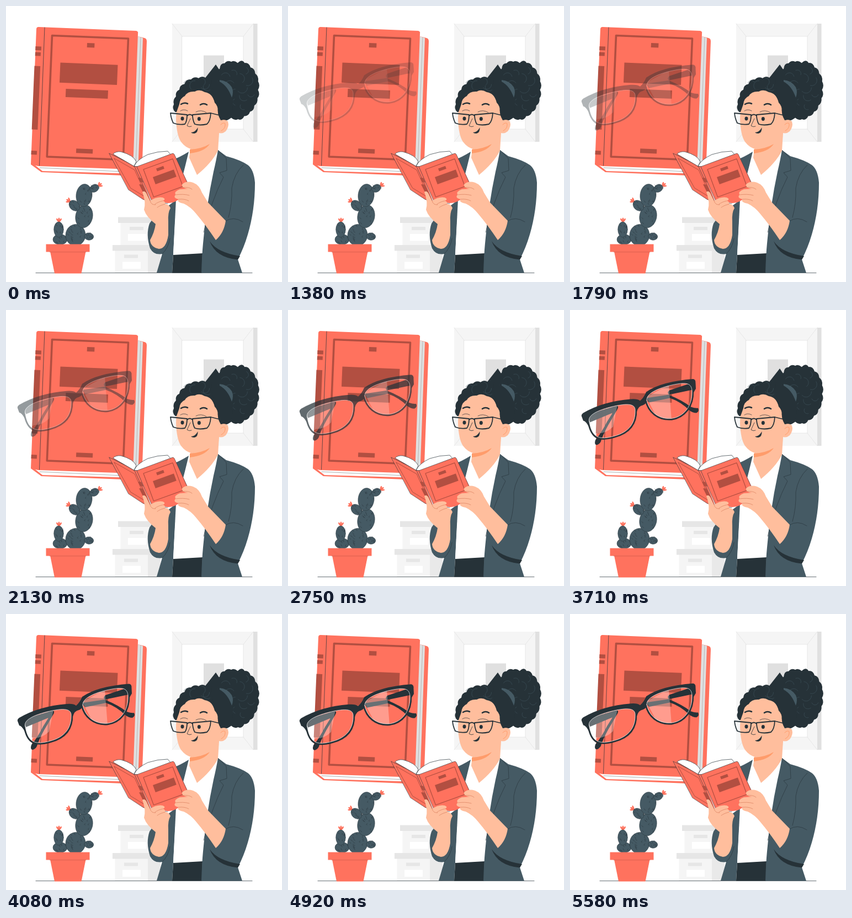
These frames come from a looping animation (500x500 px, 5.62 s). An HTML page with a canvas:

```html
<!DOCTYPE html>
<html lang="en">
<head>
<meta charset="utf-8">
<title>Reading</title>
<style>
html, body { margin: 0; width: 100%; height: 100%; overflow: hidden; background: #fff; }
canvas { display: block; width: 100vw; height: 100vh; }
</style>
</head>
<body>
<canvas id="stage"></canvas>
<script>
const SIZE = 500, LOOP = 5620, DROP = 30, TAU = Math.PI * 2;
const RED = '#ff725e', DEEP = '#b24f41', DARK = '#263238', SLATE = '#455a64';
const SKIN = '#ffbe9d', BLUSH = '#ff9c6b', PALE = '#f5f5f5', GREY = '#e0e0e0', WHITE = '#fff';

const scale = Math.max(1, window.devicePixelRatio || 1);

function prepare(canvas) {
  canvas.width = canvas.height = SIZE * scale;
  return canvas.getContext('2d');
}
const scene = document.createElement('canvas');
const layer = document.createElement('canvas');
const view = prepare(document.getElementById('stage'));
const sceneCtx = prepare(scene), layerCtx = prepare(layer);
sceneCtx.scale(scale, scale);
let g = sceneCtx;

let seed = 7;
const rnd = () => (seed = seed * 16807 % 2147483647) / 2147483647;

function fill(d, color) {
  g.fillStyle = color;
  g.fill(new Path2D(d));
}

function line(d, color = DARK, width = 0.7) {
  g.strokeStyle = color;
  g.lineWidth = width;
  g.lineCap = g.lineJoin = 'round';
  g.stroke(new Path2D(d));
}

function rect(x1, y1, x2, y2, color) {
  g.fillStyle = color;
  g.fillRect(x1, y1, x2 - x1, y2 - y1);
}

function oval(x, y, rx, ry, turn, color) {
  g.beginPath();
  g.ellipse(x, y, rx, ry, turn, 0, TAU);
  g.fillStyle = color;
  g.fill();
}

// Returns a painter of parallelograms lying on one slanted surface.
function surface(slope, lean) {
  return (x, y, w, h, border) => {
    const d = `M${x} ${y}l${w} ${w * slope}l${h * lean} ${h}l${-w} ${-w * slope}Z`;
    if (border) line(d, DEEP, border); else fill(d, DEEP);
  };
}

// Bumpy path along part of a rounded oval.
function curls(x, y, rx, ry, from, to, count, jitter) {
  const at = (a, k) => [Math.cos(a) * rx, Math.sin(a) * ry].map((v, i) => (i ? y : x) + v * k);
  const step = (to - from) / count;
  let d = 'M' + at(from, 1);
  for (let i = 0; i < count; i++) {
    const a = from + step * i, k = 1 + (rnd() - 0.5) * jitter;
    d += `Q${at(a + step / 2, k + 0.1)} ${at(a + step, i < count - 1 ? k : 1)}`;
  }
  return d;
}

// Loose strands scattered over an oval.
function strands(x, y, rx, ry, count) {
  for (let i = 0; i < count; i++) {
    const a = i * 2.4, r = Math.sqrt((i + 0.5) / count) * 0.9;
    g.beginPath();
    g.arc(x + Math.cos(a) * rx * r, y + Math.sin(a) * ry * r, 6 + rnd() * 4, a, a + 2.4);
    g.strokeStyle = SLATE;
    g.lineWidth = 0.5;
    g.stroke();
  }
}

function drawFrame() {
  rect(301, 32, 448, 246, PALE);
  rect(448, 32, 455.5, 246, GREY);
  rect(319, 55, 430, 223, WHITE);
  line('M319 55H430V223H319ZM301 32L319 55M448 32L430 55M301 246L319 223M448 246L430 223', GREY);
  rect(358, 89.5, 395, 190, GREY);
}

function drawBox(x, y, right, bottom, side) {
  rect(x + 4.5, y + 10, right, bottom, PALE);
  rect(side, y + 10, right, bottom, '#e9e9e9');
  rect(x, y, right, y + 10.5, '#e6e6e6');
  rect(x + 21, y + 17.5, x + 46, y + 23.5, '#e6e6e6');
  rect(x + 18, y + 30.5, x + 51, y + 43, WHITE);
}

function drawBigBook() {
  fill('M239 55L251 58Q255 59 255 64L246 307L212 307L64 301L45 287Z', RED);
  fill('M236 54L248 58L239 304L226 300Z', GREY);
  line('M244 57L235 290', '#a5a5a5');
  fill('M52 288L235 295V304L66 299Z', WHITE);
  line('M61 293L210 300', '#777', 0.6);
  fill('M59 38L236 45Q240 46 239 50L230 296L58 290L45 287L55 42Q55 38 59 38Z', RED);
  line('M70 39L60.5 289');
  const plate = surface(0.04, -0.042);
  plate(53.5, 73, 10.5, 7);
  plate(53, 83.5, 10, 6.7);
  plate(51.5, 108.5, 10.7, 115);
  plate(45.8, 262, 10.3, 7);
  plate(83.5, 53.5, 138, 219.5, 3.6);
  plate(147, 67, 13.5, 8);
  plate(98.5, 102.5, 104, 36.3);
  plate(108.5, 150, 76.5, 15);
  plate(127.3, 258.3, 30, 8);
}

function bloom(x, y, turn) {
  for (let i = -1; i < 2; i++) {
    const a = turn + i * 0.65;
    oval(x + Math.cos(a) * 3.4, y + Math.sin(a) * 3.4, 4.2, 1.5, a, RED);
  }
}

function pad(x, y, rx, ry, turn) {
  oval(x, y, rx, ry, turn, SLATE);
  g.strokeStyle = DARK;
  g.lineWidth = 0.5;
  g.stroke();
  for (let i = 0; i < rx * 0.9; i++) {
    const a = rnd() * TAU, r = Math.sqrt(rnd()) * 0.9;
    const px = x + Math.cos(a) * rx * r, py = y + Math.sin(a) * ry * r;
    line(`M${px} ${py}l${Math.cos(a) * 2} -2.2M${px} ${py}l1.5 .8`, DARK, 0.4);
  }
  // Grows a smaller pad at the given angle.
  return (a, size, flower) => {
    const bx = x + Math.cos(a) * (rx + size * 0.75), by = y + Math.sin(a) * (ry + size * 0.7);
    if (flower) bloom(bx + Math.cos(a) * size, by + Math.sin(a) * size, a - 0.2);
    pad(bx, by, size, size * 0.78, a);
  };
}

function drawPlant() {
  pad(98, 423, 13, 9.5, 0);
  bloom(96, 391, -TAU / 4);
  pad(95.5, 405, 8.8, 14, 0);
  pad(126, 415, 18, 19.5, 0.1)(0.1, 8.5);
  pad(141.5, 381, 15.5, 21, 0.2)(-2.4, 11, true);
  pad(141.5, 343, 14.5, 20.5, 0.1)(-0.5, 8.7, true);
  fill('M79 440H145.5L136.5 484.5H88Z', RED);
  rect(72.5, 431.5, 151.5, 445.5, RED);
  line('M79 445.7H145', DEEP, 0.5);
}

function drawBody() {
  // Torso, shirt and skirt
  fill('M331 264Q313 275 303 278L310 350L306 395L303 450L301 483H273Q279 463 283 449Q268 452 261 439Q253 414 260 394L270 380L310 350Z', SLATE);
  fill('M332 266L384 261L379 310L357 450H303L308 350Z', WHITE);
  fill('M303 451L356 448L355 483.5H301Z', DARK);
  // Jacket on the right
  fill('M384 261L399 272Q425 279 438 288Q449 296 451 320Q451 370 438 414Q431 438 420 459L428 483.5H354Q355 450 357 430Q363 360 376 300Q381 279 384 261Z', SLATE);
  fill('M369 426Q383 447 424 453L420 459.5Q380 456 369 426Z', DARK);
  line('M384 261L399 276L400 298L387 302L394 310Q372 353 358 410M430 288Q413 304 409 330Q410 358 403 383M397 390Q412 380 429 391M283 449Q294 439 297 421', DARK, 0.6);
  // Neck
  fill('M335 248L332 275L346 306Q373 284 384 262L387 215L365 205Z', SKIN);
  fill('M333 260Q354 259 369 250Q360 264 333 267Z', BLUSH);
}

function drawHead() {
  // Bun
  fill(curls(414, 152, 42.5, 52, 0, TAU, 22, 0.12), DARK);
  fill('M358 134L380 106L410 150Z', DARK);
  strands(422, 148, 32, 42, 13);
  // Face
  fill('M309 177L308 205Q309 234 317 246Q326 258 337 259Q361 257 387 229L392 190L365 145H330Z', SKIN);
  // Front hair: bumpy outside, smooth hairline
  fill(curls(353, 179, 48, 49, 2.87, 5.5, 9, 0.04) +
    'L388 176L384 190Q384 181 378 175Q374 158 360 156Q350 150 342 155Q329 154 324 163Q315 167 314 178L309 192Z', DARK);
  fill('M372 133H390L411 158Q413 184 407 203Q399 210 389 207Q382 196 384 183L376 165Z', DARK);
  strands(352, 142, 28, 7, 5);
  fill('M387 134Q401 135 409 147Q413 156 409 166Q402 145 387 137Z', SLATE);
  // Ear
  fill('M386 209Q395 203 402 209Q405 218 398 227Q391 233 384 229Z', SKIN);
  line('M390 226Q398 222 397 213Q394 210 389 215', BLUSH, 1);
  // Features
  line('M317 178Q323 174 329 177M352 179Q358 175 364 179', DARK, 2.6);
  line('M316 190Q322 186 329 190M344 192Q353 187 363 193', DARK, 0.7);
  oval(319.5, 204, 3, 3.4, 0, DARK);
  oval(349.8, 204.5, 3, 3.4, 0, DARK);
  line('M334 204L328 217Q332 220 336 218', DARK, 0.8);
  fill('M335 229Q343 229 347.5 220Q348 230 341 231Q337 231 335 229Z', DARK);
  // Worn glasses
  line('M298 194L328 197Q328 209 324 214Q313 216 303 212Q299 204 298 194ZM338 197L371 194Q370 209 364 214Q351 217 342 214Q338 207 338 197ZM328 199Q333 194 338 199M371 194L387 198', DARK, 1.8);
}

function drawSmallBook() {
  fill('M187 267L232 289L238 290L263 355L249 351L222 333Z', RED);
  line('M187 267L232 289L262 355L248 350L222 333Z', DARK, 0.6);
  const back = surface(0.1, 0.5), front = surface(-0.36, 0.37);
  back(239, 311, 6, 8);
  back(241, 323, 6, 27);
  line('M196 276L233 297L256 348L226 330Z', DEEP, 1);
  const pages = 'M194 268Q199 263 208 264Q231 270 236 282L232 290ZM232 290Q238 278 257 269Q275 263 293 263L298 269L240 291Z';
  fill(pages, WHITE);
  line(pages);
  fill('M237 291L302 267Q304 267 305 269L334 331L318 346Q306 358 293 357L264 353Z', RED);
  line('M333 330L305 269Q304 267 302 267L237 291L264 353L293 358', DARK, 0.6);
  front(249, 296, 53, 50, 1.2);
  front(272, 294.5, 13, 5);
  front(266, 310, 38, 13);
}

function drawHands() {
  fill('M247 337Q252 333 256 343L261 353Q273 345 284 347Q291 350 284 353Q289 354 288 358Q296 360 298 366Q293 374 294 390V415Q290 440 277 440Q262 437 261 424Q269 410 271 395Q254 382 250 369Q254 356 247 337Z', SKIN);
  fill('M319 323Q327 316 339 320Q350 324 355 338L366 356L398 389Q395 411 380 424Q362 397 345 377Q335 364 322 358Q308 355 313 350Q302 348 307 342Q304 336 315 332L330 331Q318 330 319 323Z', SKIN);
  line('M261 353Q263 361 271 360M284 353Q275 355 270 359M288 359Q279 361 274 365M319 329Q331 327 337 332M307 342Q322 340 332 343M313 350Q324 349 331 353', '#d87f5d', 0.7);
}

function drawScene() {
  rect(0, 0, SIZE, SIZE, WHITE);
  drawFrame();
  drawBox(203, 382.5, 282, 433, 264);
  drawBox(193, 433, 280, 483.5, 257);
  drawBigBook();
  line('M54 483.5H446');
  drawPlant();
  drawBody();
  drawHead();
  drawSmallBook();
  drawHands();
}

const LENSES = 'M35 203C30 190 55 181 75 176C100 170 117 169 118 181C119 205 107 222 80 229C55 236 40 234 35 203Z' +
  'M139 164C138 150 165 140 192 135C214 131 220 135 221 147C222 175 206 194 184 197C160 199 143 184 139 164Z';

function drawGlasses() {
  // Rims, brow and bridge
  line(LENSES, DARK, 6.5);
  fill('M21 193Q20 190 24 187Q60 166 110 162Q122 161 127 165Q134 159 138 149Q165 130 223 125.5Q228 126 227.5 133L228 143L221 155L205 140L142 162Q138 171 132 173Q124 174 121 185L104 176L40 192L34 212Q29 202 24 201Z', DARK);
  g.globalCompositeOperation = 'destination-out';
  fill(LENSES, DARK);
  // Folded temples behind the lenses
  g.globalCompositeOperation = 'destination-over';
  fill('M31 190L84 174Q90 174 85 182L74 201Q64 217 57 235Q56 242 49 245Q43 245 46 236Q57 223 67 203L77 187L36 204Z', DARK);
  fill('M222 132L180 146Q174 151 181 155Q203 164 219 176Q228 179 232 178Q235 184 229 187Q222 187 216 182Q201 167 181 160L143 168L138 160L179 154L222 145Z', DARK);
  g.globalCompositeOperation = 'source-over';
  g.save();
  g.clip(new Path2D(LENSES));
  fill('M30 190L86 172L78 212Q66 224 50 224L40 232ZM138 158L179 136L184 200H160Z', 'rgba(255,255,255,.3)');
  g.restore();
  line(LENSES, 'rgba(255,255,255,.85)', 0.8);
}

const bezier = (t, a, b) => 3 * (1 - t) * (1 - t) * t * a + 3 * (1 - t) * t * t * b + t * t * t;

function ease(x) {
  let lo = 0, hi = 1;
  for (let i = 0; i < 30; i++) {
    const mid = (lo + hi) / 2;
    if (bezier(mid, 0.36, 0.5) < x) lo = mid; else hi = mid;
  }
  return bezier(lo, -0.01, 1.38);
}

function render(now) {
  const p = ease(now % LOOP / LOOP);
  g = layerCtx;
  g.setTransform(1, 0, 0, 1, 0, 0);
  g.clearRect(0, 0, layer.width, layer.height);
  g.setTransform(scale, 0, 0, scale, 0, (p - 1) * DROP * scale);
  drawGlasses();

  view.globalAlpha = 1;
  view.drawImage(scene, 0, 0);
  view.globalAlpha = Math.min(1, Math.max(0, p));
  view.drawImage(layer, 0, 0);
}

drawScene();
const start = performance.now();
function tick() {
  render(performance.now() - start);
  requestAnimationFrame(tick);
}
tick();
</script>
</body>
</html>
```
